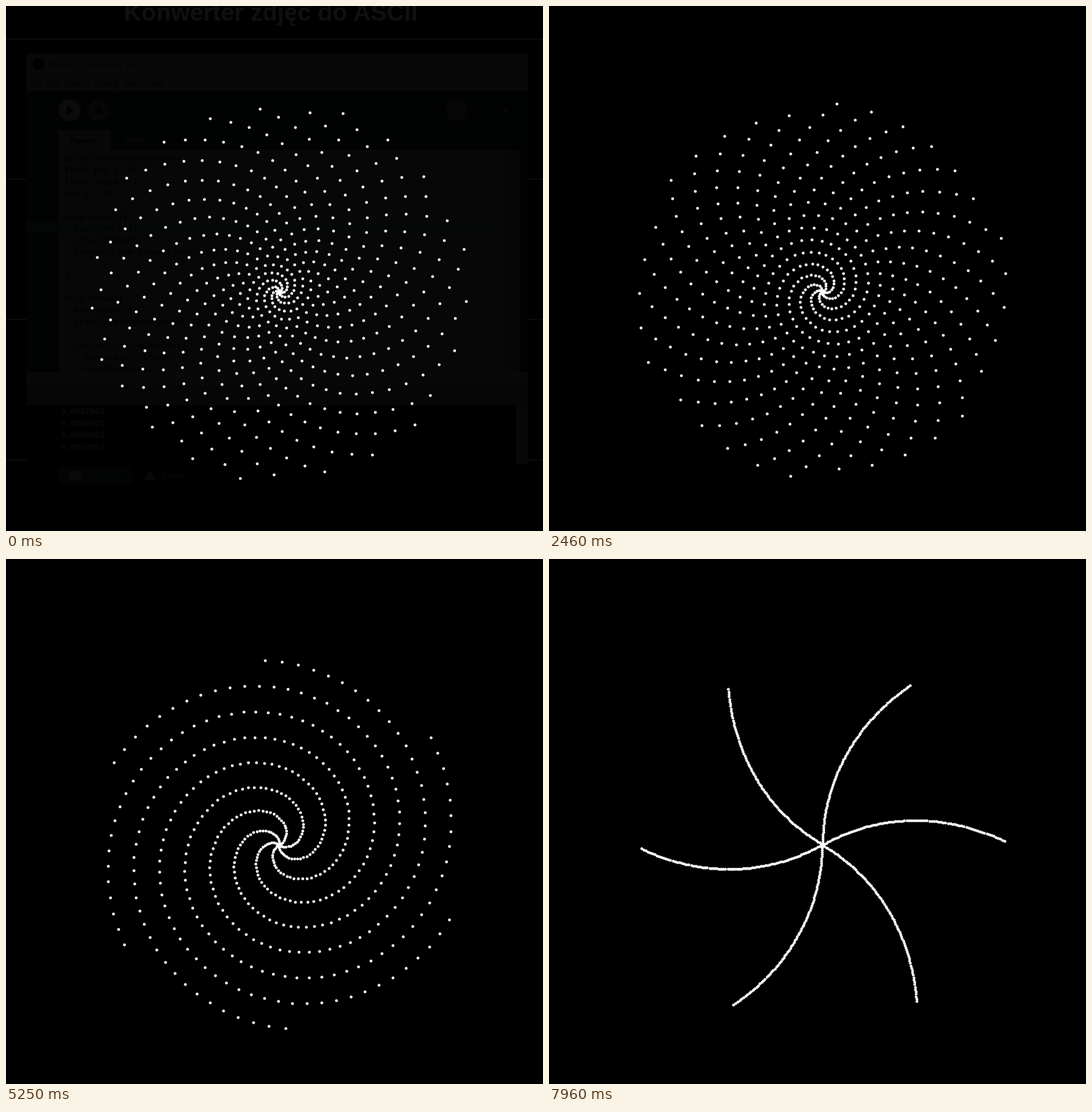
Write an HTML page that moves like this. It is 732 px wide and 715 px high and loops after 8 s.

```html
<!DOCTYPE html>
<html lang="pl">
<head>
<meta charset="utf-8">
<title>Spiral</title>
<style>
html, body { margin: 0; width: 100%; height: 100%; overflow: hidden; background: #000; }
svg { display: block; width: 100%; height: 100%; }
text { white-space: pre; }
.ui { font: 11px "Open Sans", sans-serif; }
.code { font: 11px "DejaVu Sans Mono", monospace; }
</style>
</head>
<body>
<svg viewBox="0 0 732 715">
  <rect width="732" height="715" fill="#000"/>
  <g id="ghost">
    <text x="361" y="20" text-anchor="middle" fill="#101010" style="font: bold 33px 'Liberation Sans', Arial, sans-serif">Konwerter zdjęć do ASCII</text>
    <path d="M0 45H732M0 236H28M712 236H732M0 427H28M712 427H732M0 618H28M712 618H732" stroke="#0a0a0a" stroke-width="2"/>
    <rect x="28" y="65" width="684" height="51" fill="#080808"/>
    <circle cx="44" cy="79" r="8" fill="#000"/>
    <g class="ui" fill="#020202">
      <text x="60" y="84">flower | Processing 3.5.3</text>
      <text x="32" y="109">File  Edit  Sketch  Debug  Tools  Help</text>
    </g>
    <path d="M591 79h10M639 75h8v8h-8zM688 75l8 8m0-8l-8 8" stroke="#020202" fill="none"/>
    <rect x="28" y="116" width="684" height="384" fill="#010202"/>
    <g fill="#0b0b0b">
      <circle cx="87" cy="142" r="15"/>
      <circle cx="126" cy="142" r="15" fill="#060606"/>
      <circle cx="614" cy="142" r="15" fill="#060606"/>
    </g>
    <path d="M83 136l10 6-10 6z" fill="#000"/>
    <rect x="121" y="137" width="10" height="10" fill="#010101"/>
    <text class="ui" x="652" y="146" fill="#080808">Java ▼</text>
    <rect x="72" y="169" width="70" height="28" fill="#080808"/>
    <g class="ui" style="font-weight: bold">
      <text x="88" y="187" fill="#000">flower</text>
      <text x="161" y="187" fill="#080808">point</text>
    </g>
    <rect x="72" y="196" width="628" height="304" fill="#070707"/>
    <rect x="28" y="294" width="44" height="15" fill="#040606"/>
    <rect x="72" y="294" width="612" height="15" fill="#060808"/>
    <rect x="684" y="196" width="16" height="304" fill="#060606"/>
    <path d="M688 209l4-4 4 4M688 489l4 4 4-4M40 504l-4 4 4 4M673 504l4 4-4 4" stroke="#010101" fill="none"/>
    <g id="code" class="code" fill="#010101"></g>
    <rect x="28" y="499" width="684" height="17" fill="#080808"/>
    <rect x="28" y="516" width="684" height="28" fill="#060606"/>
    <rect x="695" y="544" width="17" height="80" fill="#070707"/>
    <g id="log" class="code" fill="#0e0e0e"></g>
    <rect x="72" y="627" width="100" height="25" fill="#020404"/>
    <rect x="86" y="633" width="16" height="12" fill="#090909"/>
    <path d="M188 645l8-13 8 13z" fill="#080808"/>
    <g class="ui" fill="#090909">
      <text x="111" y="643">Console</text>
      <text x="213" y="643">Errors</text>
    </g>
    <path d="M357 656l4 4 4-4" stroke="#0a0a0a" fill="none"/>
  </g>
  <path id="dots" fill="none" stroke="#fff" stroke-width="4" stroke-linecap="round"/>
</svg>
<script>
const LOOP = 8000, COUNT = 500, GAP = 0.5, CX = 373, CY = 390;
const TURN = 839 / 2 ** 23; // 0.0001 added to 1 in single precision
const ghost = document.getElementById('ghost');
const dots = document.getElementById('dots');

const code = `ArrayList<Point> points;
float gap = .5;
float angle = 1;
int n = 0;

void setup(){
  size(800,800);
  //fullScreen();
  points = new ArrayList<Point>();

}

void draw(){
  background(0);
  translate(width/2,height/2);

  for(int i=0;i<500;i++){
    translate(0,i*gap);
    rotate(angle);`;

function addLines(id, lines, x, y, step) {
  const g = document.getElementById(id);
  lines.forEach((line, i) => {
    const t = document.createElementNS('http://www.w3.org/2000/svg', 'text');
    t.setAttribute('x', x);
    t.setAttribute('y', y + i * step);
    t.textContent = line;
    g.appendChild(t);
  });
}
addLines('code', code.split('\n'), 80, 211, 15.95);
addLines('log', ['0.0007001', '0.0008001', '0.0009001', '0.0010001'], 75, 556, 16);

const snap = v => Math.floor(v) + 0.5;

// Each dot steps i * GAP ahead of the previous one, then turns by angle.
// Dots sit on pixel centres.
function spiral(angle) {
  let x = CX, y = CY, d = '';
  for (let i = 0; i < COUNT; i++) {
    x -= i * GAP * Math.sin(i * angle);
    y += i * GAP * Math.cos(i * angle);
    d += `M${snap(x)} ${snap(y)}h0`;
  }
  return d;
}

let shown = -1;
function render(ms) {
  // Picture steps of about 80 ms, on a 10 ms clock
  const step = Math.floor((Math.floor(ms / 10) * 10 + 19.4) / 79.75);
  if (step === shown) return;
  shown = step;
  const turns = Math.round(13.2 + 4.69 * step);
  dots.setAttribute('d', spiral(1 + turns * TURN));
  ghost.style.display = step === 0 ? '' : 'none';
}

let start = null;
function tick(now) {
  if (start === null) start = now;
  render(Math.max(0, now - start) % LOOP);
  requestAnimationFrame(tick);
}
render(0);
requestAnimationFrame(tick);
</script>
</body>
</html>
```
